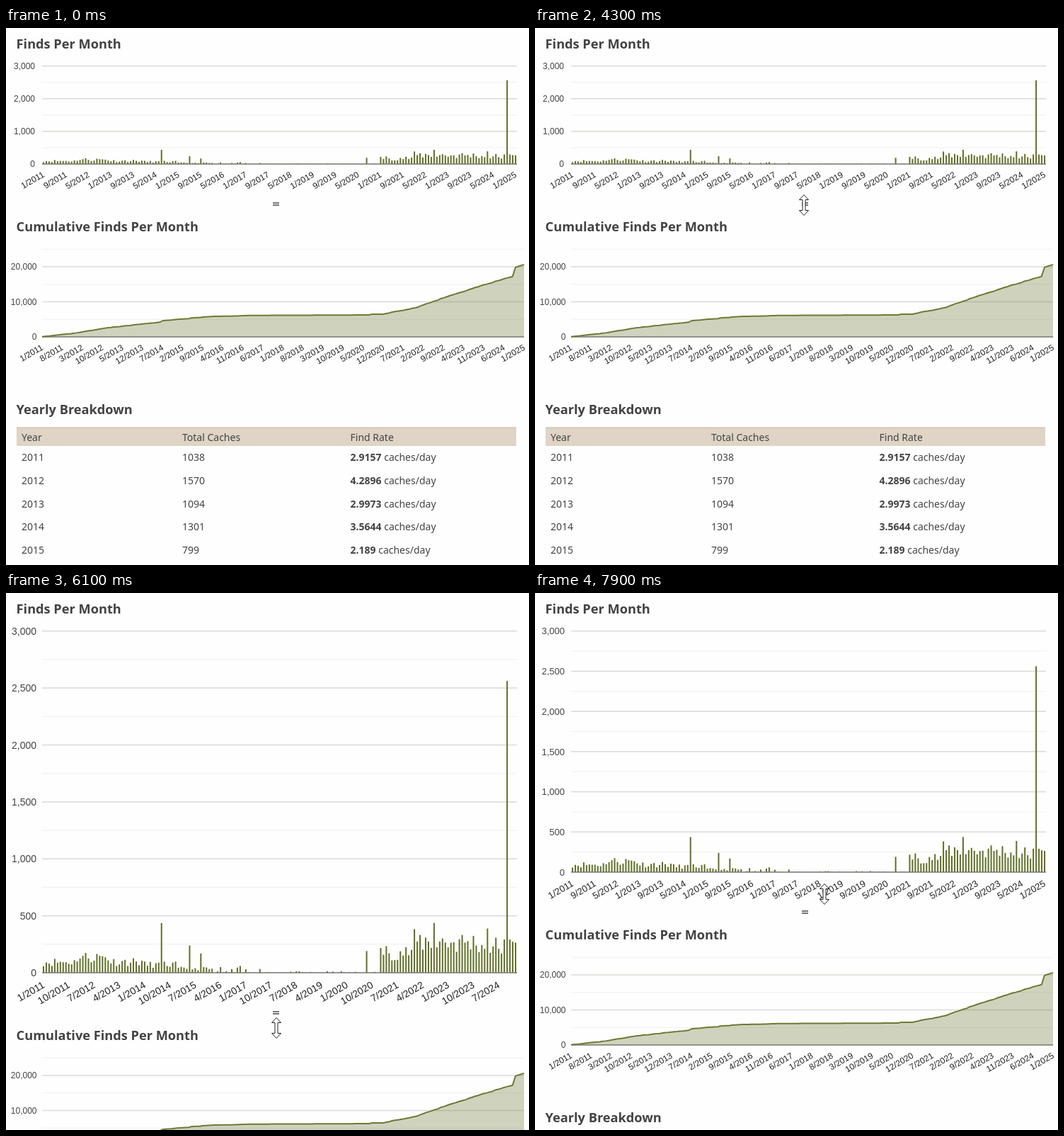
These frames come from a looping animation (739x758 px, 8000 ms). An HTML page with a canvas:

```html
<!DOCTYPE html>
<html lang="en">
<head>
<meta charset="utf-8">
<title>Resizable chart</title>
<style>
  html, body { margin: 0; width: 100%; height: 100%; overflow: hidden; background: #fefefe; }
  canvas { display: block; }
</style>
</head>
<body>
<canvas id="stage" width="739" height="758"></canvas>
<script>
const ctx = document.getElementById('stage').getContext('2d');
const LOOP = 8000, STEP = 100, MONTHS = 169;
const SANS = '"Noto Sans", "Open Sans", sans-serif';
const ARIAL = '"Liberation Sans", Arial, sans-serif';

// Yearly totals from 2011 on; each year is spread over its months at random, around a few fixed peaks
const yearly = [1038, 1570, 1094, 1301, 799, 260, 80, 50, 45, 220, 2030, 3490, 3050, 5350];
const peaks = { 42: 436, 52: 239, 56: 169, 115: 190, 139: 437, 158: 388, 165: 2562 };
const rates = ['2.9157', '4.2896', '2.9973', '3.5644', '2.189'];

let seed = 11;
const random = () => (seed = seed * 16807 % 2147483647) / 2147483647;

const finds = yearly.flatMap((total, year) => {
  const fixed = Array.from({ length: 12 }, (_, i) => peaks[year * 12 + i] || 0);
  const weights = fixed.map(v => v ? 0 : total < 300 ? random() ** 4 : 0.6 + 0.8 * random());
  const add = (a, b) => a + b;
  const scale = (total - fixed.reduce(add)) / weights.reduce(add);
  return weights.map((w, i) => fixed[i] || w * scale);
}).concat(264);
let sum = 0;
const totals = finds.map(v => sum += v);

// Keys: [time, value]
const growth = [
  [5100, 0], [5500, 80], [5700, 139], [5800, 157], [6100, 344], [6200, 363],
  [6500, 472], [7300, 472], [7400, 445], [7900, 202], [8000, 174]
];
const gripX = [[4200, 382], [4300, 380], [5100, 380], [5700, 392], [6100, 382], [7300, 392], [7900, 409]];

function at(keys, t) {
  const i = keys.findIndex(key => key[0] > t);
  if (i === 0) return keys[0][1];
  if (i < 0) return keys[keys.length - 1][1];
  const [t0, a] = keys[i - 1], [t1, b] = keys[i];
  return a + (b - a) * (t - t0) / (t1 - t0);
}

const clamp = (v, lo, hi) => Math.min(hi, Math.max(lo, v));
const mix = (a, b, u) => a.map((v, i) => v + (b[i] - v) * u);

// The arrow flies in, circles over the chart, rests, then heads for the handle
function arrowAt(t) {
  const phase = (clamp(t, 1100, 2800) - 1100) / 1200 * 2 * Math.PI;
  const orbit = [385 - 52 * Math.cos(phase), 187 + 13 * Math.sin(phase)];
  if (t < 1100) return mix(orbit, [643, 88], ((1100 - t) / 800) ** 2);
  return mix(orbit, [390, 236], clamp((t - 3100) / 300, 0, 1));
}

function text(str, x, y, font, color = '#444', align = 'left') {
  ctx.font = font;
  ctx.fillStyle = color;
  ctx.textAlign = align;
  ctx.fillText(str, x, y);
}

function rule(x1, x2, y, color, width = 1) {
  ctx.fillStyle = color;
  ctx.fillRect(x1, y - width / 2, x2 - x1, width);
}

function grid(right, base, max, step, unit, size, labelX, labelMax) {
  for (let v = step / 2; v <= max; v += step / 2) {
    const major = v % step === 0;
    rule(51, right, base - v * unit, major ? '#dadad5' : '#efefec', major ? 1.5 : 1);
  }
  for (let v = 0; v <= labelMax; v += step) {
    text(v.toLocaleString('en-US'), labelX, base - v * unit + size * 0.36, `${size}px ${ARIAL}`, '#444', 'right');
  }
}

function monthLabels(x0, dx, every, base, size) {
  for (let i = 0; i < MONTHS; i += every) {
    ctx.save();
    ctx.translate(x0 + i * dx, base + size * 1.13);
    ctx.rotate(-Math.PI / 6);
    text(`${i % 12 + 1}/${2011 + Math.floor(i / 12)}`, 0, size * 0.36, `${size}px ${ARIAL}`, '#222', 'right');
    ctx.restore();
  }
}

const heading = (str, y) => text(str, 14.6, y, `bold 18.2px ${SANS}`, '#424242');

function barChart(d) {
  const base = 192 + d, height = 138.3 + d, unit = height / 3000, dx = 671 / MONTHS;
  const size = Math.round(Math.cbrt(2 * (946 + d)));
  const step = [200, 500, 1000].find(s => height * s / 3000 >= 40);
  heading('Finds Per Month', 29);
  grid(722, base, 3000, step, unit, size, 29 + size, 3000);
  ctx.fillStyle = '#616f27';
  finds.forEach((v, i) => ctx.fillRect(51.99 + i * dx, base - v * unit, 2, v * unit));
  rule(51, 722, base, '#77776f', 1.5);
  monthLabels(52.99, dx, size > 13 ? 9 : 8, base, size);
}

function areaChart() {
  const base = 436, unit = 99 / 20000, dx = 681 / (MONTHS - 1);
  heading('Cumulative Finds Per Month', 287);
  grid(732, base, 25000, 10000, unit, 12, 43.5, 20000);
  const line = new Path2D();
  totals.forEach((v, i) => line.lineTo(51 + i * dx, base - v * unit));
  const area = new Path2D(line);
  area.lineTo(732, base);
  area.lineTo(51, base);
  ctx.fillStyle = 'rgba(105, 120, 50, .32)';
  ctx.fill(area);
  rule(51, 732, base, '#77776f', 1.5);
  ctx.strokeStyle = '#6c7a34';
  ctx.lineWidth = 2;
  ctx.stroke(line);
  monthLabels(51, dx, 7, base, 12);
}

function table() {
  const font = `14px ${SANS}`, bold = `bold 14px ${SANS}`, cols = [22, 249, 486.5];
  heading('Yearly Breakdown', 545);
  ctx.fillStyle = '#dfd4c5';
  ctx.fillRect(15, 564, 706, 26);
  rule(15, 721, 564, '#c8b9a3');
  ['Year', 'Total Caches', 'Find Rate'].forEach((s, i) => text(s, cols[i], 583, font));
  rates.forEach((rate, i) => {
    const y = Math.round(611.4 + i * 32.6);
    text(2011 + i, cols[0], y, font);
    text(yearly[i], cols[1], y, font);
    text(rate, cols[2], y, bold);
    text(' caches/day', cols[2] + ctx.measureText(rate).width, y, font);
  });
}

const arrow = new Path2D('M0 0V19.5L4.5 15.5L7.5 22.5L10.5 21L7.5 14.5L13.5 14Z');
const grip = new Path2D('M0-14.5L6.5-7.5H2V7.5H6.5L0 14.5L-6.5 7.5H-2V-7.5H-6.5Z');

function pointer(shape, x, y) {
  ctx.save();
  ctx.translate(x, y);
  ctx.fillStyle = '#fff';
  ctx.strokeStyle = '#222';
  ctx.lineWidth = 1;
  ctx.fill(shape);
  ctx.stroke(shape);
  ctx.restore();
}

function draw(t) {
  const d = at(growth, t);
  ctx.fillStyle = '#fefefe';
  ctx.fillRect(0, 0, 739, 758);
  barChart(d);
  ctx.save();
  ctx.translate(0, Math.round(d));
  rule(377, 386, 247, '#777', 2);
  rule(377, 386, 250, '#777', 2);
  areaChart();
  table();
  ctx.restore();
  // The handle trails the pointer by one step
  if (t >= 3500) pointer(grip, at(gripX, t), 250 + (t >= 4600) + at(growth, t + STEP));
  else if (t >= 300) pointer(arrow, ...arrowAt(t));
}

function tick() {
  draw(Math.floor(performance.now() % LOOP / STEP) * STEP);
  requestAnimationFrame(tick);
}
tick();
</script>
</body>
</html>
```
